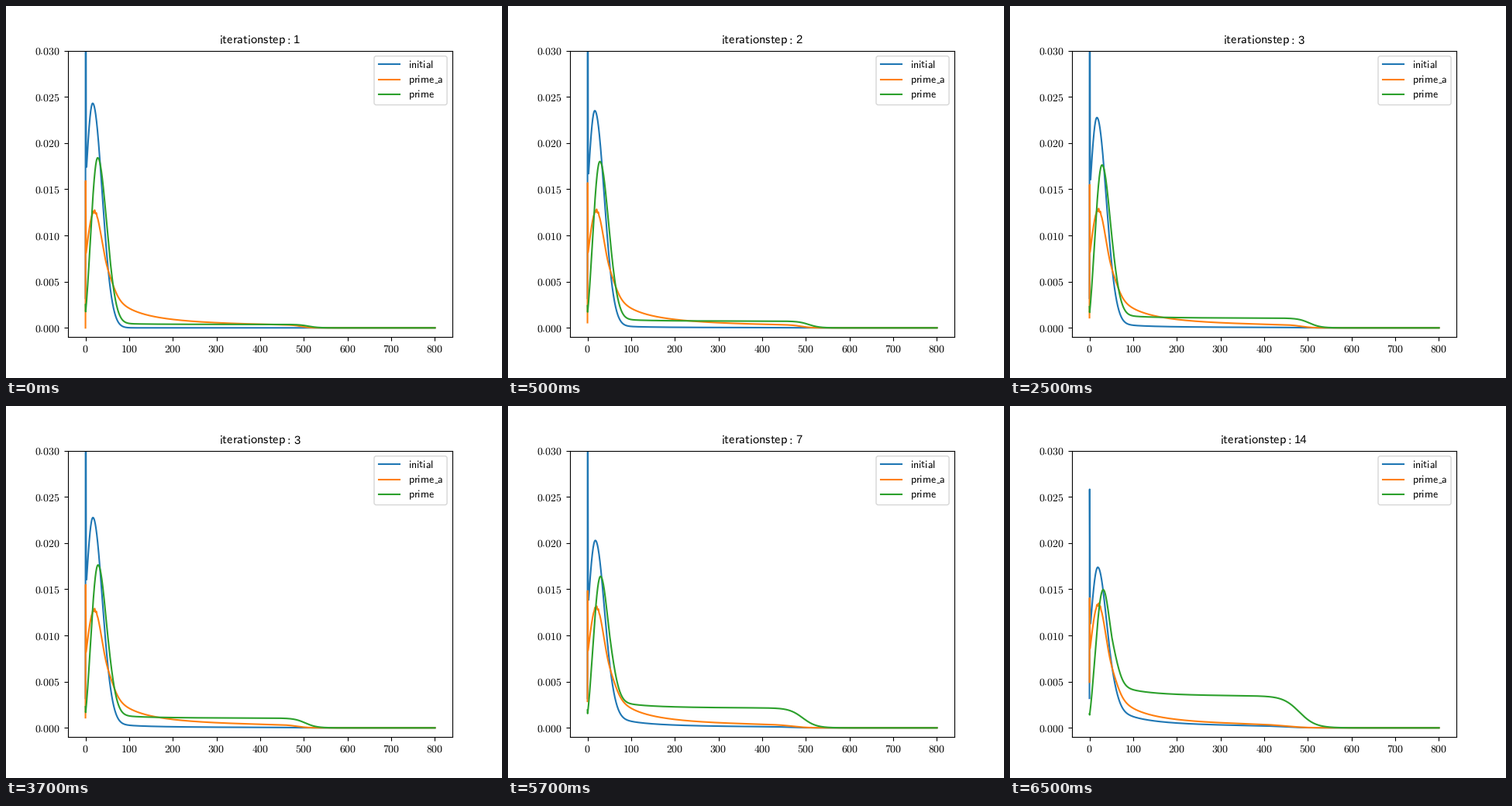
A matplotlib script for the animation above (8 s loop, 640 px wide and 480 px high).

```python
import numpy as np
import matplotlib.pyplot as plt
from matplotlib.animation import FuncAnimation
from matplotlib.patches import FancyBboxPatch

plt.rcParams.update({"mathtext.fontset": "cm", "font.size": 10,
                     "text.hinting": "none"})

BLUE, ORANGE, GREEN = "#1f77b4", "#ff7f0e", "#2ca02c"
STEPS = np.repeat([1, 2, 3, 7, 14], [1, 4, 4, 4, 3])
DIGIT_WIDTH = 8.16

x = np.concatenate([[0, 0.4, 1.5], np.linspace(2.5, 800, 1600)])


def bell(center, left, right):
    width = np.where(x < center, left, right)
    return np.exp(-(x - center) ** 2 / (2 * width ** 2))


def cutoff(center, width):
    """Smooth step from one down to zero."""
    return 0.5 * (1 - np.tanh(0.8 * (x - center) / width))


def progress(step):
    """Share of the relaxation done; drives every curve."""
    return 1 - np.exp(-(step - 1) / 13.5)


rise = x ** 8 / (x ** 8 + 55.0 ** 8)
tail = 0.00212 * (100 / np.maximum(x, 10)) ** 1.22 * rise


def tail_end(g):
    return cutoff(495 - 65 * g, 15 + 32 * g)


def initial(g):
    peak, dip = 0.0243 - 0.0112 * g, 0.0174 - 0.0099 * g
    center = 16.5 + 4.1 * g
    left = (center - 2.5) / np.sqrt(2 * np.log(peak / dip))
    y = peak * bell(center, left, 21.6) + 0.925 * g * tail * tail_end(g)
    y[:3] = 0.0032, 0.066 - 0.065 * g, dip + 0.001
    return y


def prime_a(g):
    ripple = 0.00015 * np.sin(x * np.pi / 2) * np.exp(-((x - 21) / 6) ** 4)
    y = (0.0126 + 0.0012 * g) * bell(20, 19.7, 22) + tail * tail_end(g) + ripple
    y[:2] = 0.008 * g, 0.0159 - 0.003 * g
    return y


def prime(g):
    peak_x = 28 * (1 + 0.18 * g)
    before = 0.5 * (1 + np.cos(np.pi * (1 - x / peak_x) * 28 / 34.5))
    after = np.exp(-np.maximum(x - 28, 0) ** 2 / (2 * 20.5 ** 2))
    # The peak drifts right while the falling flank stays in place.
    blend = np.clip((x - peak_x) / 20, 0, 1)
    drifted = np.exp(-np.maximum(x - peak_x, 0) ** 2 / (2 * 20.5 ** 2))
    hump = np.where(x < peak_x, before, (1 - blend) * drifted + blend * after)
    plateau = 1 + 0.23 * (100 / np.maximum(x, 30)) ** 1.5
    y = (0.0184 - 0.0057 * g) * hump
    y += (0.00036 + 0.00485 * g) * plateau * rise * cutoff(510 - 48 * g, 18 + 19 * g)
    y[0] = 0.0025 - 0.0016 * g
    return y


def sans(text):
    return rf"$\mathsf{{{text}}}$"


fig = plt.figure(figsize=(6.4, 4.8), dpi=100, facecolor="white")
ax = fig.add_axes([0.125, 0.11, 0.775, 0.77])
ax.set_xlim(-40, 840)
ax.set_ylim(-0.001, 0.03)
xticks = np.arange(0, 801, 100)
yticks = np.arange(7) * 0.005
ax.set_xticks(xticks, [f"${v}$" for v in xticks])
ax.set_yticks(yticks, [f"${v:.3f}$" for v in yticks])
ax.tick_params(axis="x", pad=2.8)
curves = [(ax.plot([], [], color=c, lw=1.5)[0], f)
          for c, f in ((BLUE, initial), (ORANGE, prime_a), (GREEN, prime))]

# Title and legend, laid out in pixels.
overlay = fig.add_axes([0, 0, 1, 1])
overlay.set_xlim(0, 640)
overlay.set_ylim(480, 0)
overlay.axis("off")
word = overlay.text(0, 48.4, sans("iterationstep:"), fontsize=11.75)
number = overlay.text(0, 48.4, "", fontsize=10.7, family="Liberation Sans")

overlay.add_patch(FancyBboxPatch(
    (475, 64.6), 94.1, 63, boxstyle="round,pad=0,rounding_size=2.78",
    facecolor=(1, 1, 1, 0.8), edgecolor=(0.8, 0.8, 0.8, 0.8), lw=1))
entries = [("initial", BLUE), (r"prime\hspace{0.41}a", ORANGE), ("prime", GREEN)]
for row, (label, color) in enumerate(entries):
    y = 75.2 + 19.45 * row
    overlay.plot([480.5, 508.3], [y, y], color=color, lw=1.5)
    overlay.text(519.2, y + 4.7, sans(label))
overlay.plot([552.6, 556.8], [99, 99], color="black", lw=0.6,
             solid_capstyle="butt")


def update(frame):
    step = STEPS[frame]
    text = str(step)
    shift = DIGIT_WIDTH / 2 * (len(text) - 1)
    word.set_x(275.4 - shift)
    number.set_x(371.2 - shift)
    number.set_text(text)
    for line, curve in curves:
        line.set_data(x, curve(progress(step)))
    return [word, number] + [line for line, _ in curves]


anim = FuncAnimation(fig, update, frames=len(STEPS), interval=500,
                     repeat=True, repeat_delay=0, blit=False)
plt.show()
```
